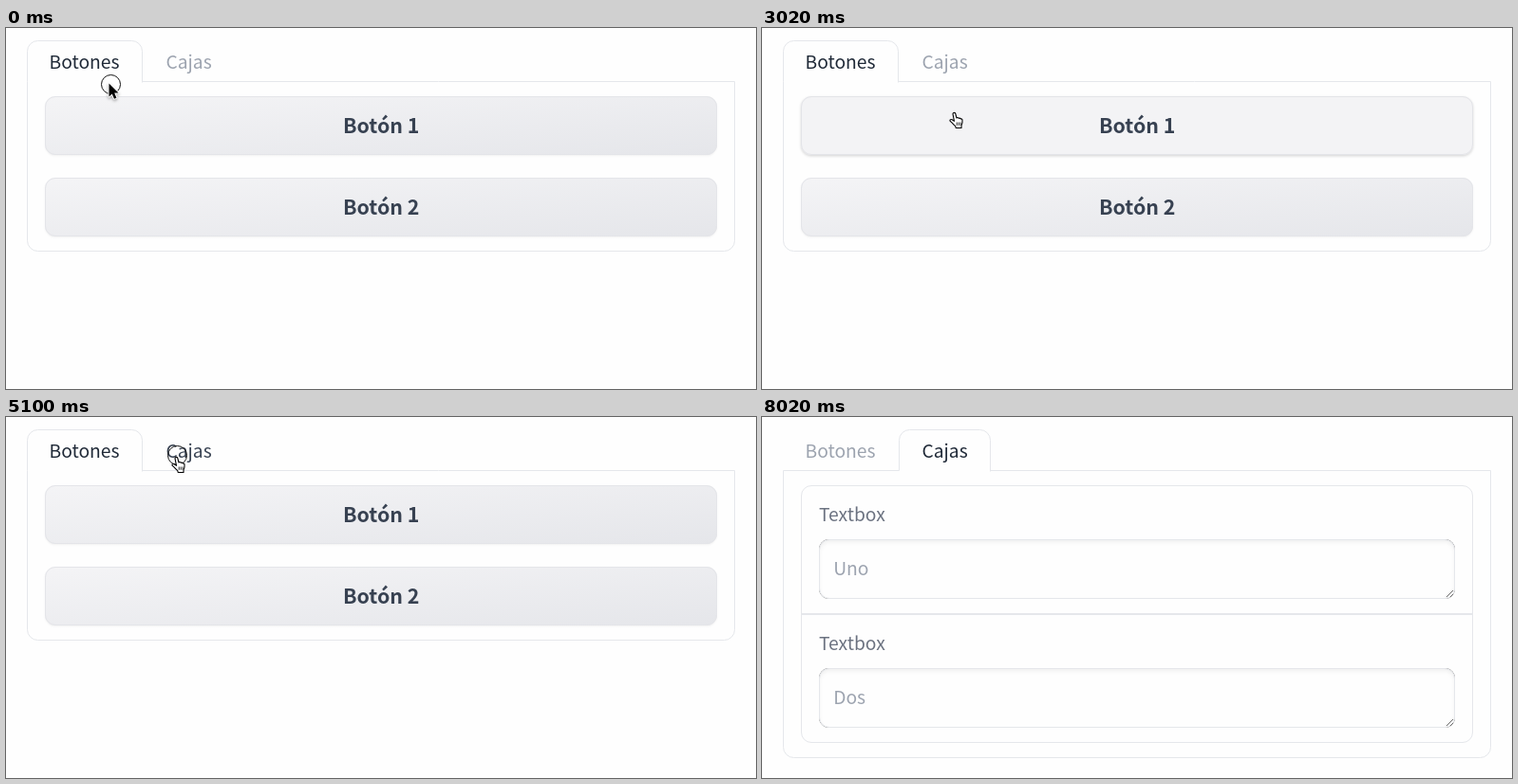
An HTML page with a canvas that plays this animation: 790x381 px, repeating every 8040 ms.

```html
<!DOCTYPE html>
<html lang="es">
<head>
<meta charset="utf-8">
<title>Botones y cajas</title>
<style>
html, body { margin: 0; width: 100%; height: 100%; overflow: hidden; background: #fefefe; }
canvas { display: block; }
</style>
</head>
<body>
<canvas id="stage" width="790" height="381"></canvas>
<script>
const ctx = document.getElementById('stage').getContext('2d', { alpha: false });
const LOOP = 8040;
const SWITCH = 5220;
const BG = '#fefefe', LINE = '#e5e7eb', MUTED = '#9ca3af';
const FONT = '"Noto Sans CJK JP", "Noto Sans CJK SC", "Noto Sans CJK KR", "Noto Sans CJK", "Open Sans", sans-serif';

const tabs = [
  { label: 'Botones', x: 22, w: 122, textX: 45.5 },
  { label: 'Cajas', x: 144, w: 97, textX: 168.4 }
];
const buttons = [
  { label: 'Botón 1', x: 41, y: 72, w: 708, h: 62, press: [2970, 3020] },
  { label: 'Botón 2', x: 41, y: 158, w: 708, h: 62, press: [4420, 4480] }
];
const boxes = [
  { hint: 'Uno', x: 60, y: 129, w: 670, h: 63, focus: [6140, 6900] },
  { hint: 'Dos', x: 60, y: 265, w: 670, h: 63, focus: [6900, 8020] }
];
const clicks = [[0, 60], [1330, 1450], [2970, 3020], [4420, 4480], [5100, 5220], [6140, 6200], [6900, 6960]];

// Pointer path: time, x, y
const path = [
  [0, 110.5, 59.5], [50, 110.5, 59.5], [230, 97, 31], [400, 91.5, 39],
  [560, 91.5, 39], [850, 118, 98], [1150, 88.5, 38.5],
  [1740, 88.5, 38.5], [1750, 86.5, 44], [2550, 202.5, 87], [2610, 203.5, 87.5],
  [3520, 203.5, 87.5], [3850, 195, 42], [4310, 161.5, 191],
  [4450, 161.5, 191], [4930, 180.5, 40.5],
  [5530, 180.5, 40.5], [6090, 176.5, 161],
  [6520, 176.5, 161], [6870, 176.5, 297],
  [7170, 176.5, 297], [7480, 718, 372], [7540, 722, 410]
];

const during = (t, [a, b]) => t >= a && t < b;
const inside = (p, r) => p.x >= r.x && p.x < r.x + r.w && p.y >= r.y && p.y < r.y + r.h;
const overTab = (p, tab) => inside(p, { x: tab.x, y: 13, w: tab.w, h: 44 });

function pointerAt(t) {
  const i = path.findIndex(k => k[0] > t);
  if (i < 0) return { x: 722, y: 410 };
  const [t0, x0, y0] = path[i - 1], [t1, x1, y1] = path[i];
  const u = (t - t0) / (t1 - t0), e = u * u * (3 - 2 * u);
  return { x: x0 + (x1 - x0) * e, y: y0 + (y1 - y0) * e };
}

function text(str, x, y, color, size = 19.25, weight = 400, align = 'left') {
  ctx.font = `${weight} ${size}px ${FONT}`;
  ctx.textAlign = align;
  ctx.fillStyle = color;
  ctx.fillText(str, x, y);
}

function rounded(r, inset = 0, radius = 11) {
  ctx.beginPath();
  ctx.roundRect(r.x + inset, r.y + inset, r.w - 2 * inset, r.h - 2 * inset, radius - inset);
}

function stroke(color, width = 1) {
  ctx.strokeStyle = color;
  ctx.lineWidth = width;
  ctx.stroke();
}

function shadow(color, blur, dy) {
  ctx.shadowColor = color;
  ctx.shadowBlur = blur;
  ctx.shadowOffsetY = dy;
}

function innerShadow(r, alpha) {
  ctx.save();
  rounded(r);
  ctx.clip();
  shadow(`rgba(0,0,0,${alpha})`, 5, 2.5);
  ctx.beginPath();
  ctx.rect(r.x - 20, r.y - 20, r.w + 40, r.h + 40);
  ctx.roundRect(r.x, r.y, r.w, r.h, 11);
  ctx.fillStyle = '#000';
  ctx.fill('evenodd');
  ctx.restore();
}

// Same geometry as a CSS gradient "to bottom right"
function cornerGradient({ x, y, w, h }) {
  const k = w * h / (w * w + h * h), cx = x + w / 2, cy = y + h / 2;
  const g = ctx.createLinearGradient(cx - h * k, cy - w * k, cx + h * k, cy + w * k);
  g.addColorStop(0, '#f4f4f6');
  g.addColorStop(1, '#e5e6ea');
  return g;
}

function drawFrame(active, bottom) {
  const x0 = tabs[active].x + 0.5, x1 = tabs[active].x + tabs[active].w - 0.5;
  ctx.beginPath();
  ctx.moveTo(x1, 56.5);
  ctx.lineTo(767.5, 56.5);
  ctx.arcTo(767.5, bottom, 700, bottom, 11);
  ctx.arcTo(22.5, bottom, 22.5, 100, 11);
  ctx.lineTo(22.5, 56.5);
  ctx.lineTo(x0, 56.5);
  ctx.arcTo(x0, 13.5, x0 + 40, 13.5, 11);
  ctx.arcTo(x1, 13.5, x1, 40, 11);
  ctx.lineTo(x1, 57.5);
  stroke(LINE);
}

function drawButton(b, t, p) {
  const hover = inside(p, b);
  ctx.save();
  if (hover) shadow('rgba(0,0,0,.16)', 3, 1.3);
  else shadow('rgba(0,0,0,.05)', 2, 1);
  rounded(b);
  ctx.fillStyle = hover ? '#f3f3f5' : cornerGradient(b);
  ctx.fill();
  ctx.restore();
  if (during(t, b.press)) innerShadow(b, 0.08);
  rounded(b, 0.5);
  stroke(hover ? '#e3e4e8' : '#e4e5e9');
  text(b.label, 395.2, b.y + 39, '#374151', 21.4, 600, 'center');
}

function drawBox(b, t) {
  const focused = during(t, b.focus);
  text('Textbox', 60, b.y - 19, '#6b7280');
  innerShadow(b, 0.07);
  rounded(b, 0.5);
  stroke(focused ? '#a3cdfd' : LINE);
  text(b.hint, 75.2, b.y + 38, MUTED);
  if (focused && (t - b.focus[0]) % 1000 < 500) {
    ctx.fillStyle = '#1f2937';
    ctx.fillRect(76, b.y + 18, 1.3, 27);
  }
  const x = b.x + b.w, y = b.y + b.h;
  ctx.beginPath();
  ctx.moveTo(x - 9, y - 2);
  ctx.lineTo(x - 2, y - 9);
  ctx.moveTo(x - 5, y - 2);
  ctx.lineTo(x - 2, y - 5);
  stroke('#6b6b6b');
}

const hand = new Path2D('M4.1 2.6C3.6 .9 6.2 .2 6.8 1.9L8 6.5C8.4 5.7 10 5.9 10.2 6.9C10.6 6.3 12 6.5 12.2 7.5C12.8 7.1 13.9 7.5 14 8.5C14.3 10.5 14.2 12 13 14.5L13 17L7.2 17L6.8 15.2C5 13.5 3.5 11.8 1.6 10.2C0 8.8 1.8 7.4 3.2 8.3L5.5 9.8Z');
const creases = new Path2D('M8.2 11V14.3M10.1 11V14.3M12 11V14.3');
const arrow = new Path2D('M0 0V14L3.2 11L5.5 16.2L7.9 15.2L5.7 10.1H10Z');
const beam = new Path2D('M-3 -7.5Q0 -7.5 0 -5.5Q0 -7.5 3 -7.5M0 -5.5V5.5M-3 7.5Q0 7.5 0 5.5Q0 7.5 3 7.5M-2 2H2');

function pen(shape, color, width) {
  ctx.strokeStyle = color;
  ctx.lineWidth = width;
  ctx.stroke(shape);
}

function drawPointer(p, t, kind) {
  if (clicks.some(c => during(t, c))) {
    ctx.beginPath();
    ctx.arc(p.x, p.y, 10, 0, Math.PI * 2);
    stroke('#111');
  }
  ctx.save();
  ctx.lineJoin = 'round';
  if (kind === 'hand') {
    ctx.translate(p.x - 6.5, p.y + 1);
    ctx.fillStyle = '#fff';
    ctx.fill(hand);
    pen(hand, '#000', 1.1);
    pen(creases, '#000', 0.8);
  } else if (kind === 'beam') {
    ctx.translate(p.x, p.y);
    pen(beam, '#fff', 2.6);
    pen(beam, '#000', 1.2);
  } else {
    ctx.translate(p.x - 2, p.y - 1);
    ctx.save();
    shadow('rgba(0,0,0,.35)', 3, 1.5);
    pen(arrow, '#fff', 2);
    ctx.restore();
    ctx.fillStyle = '#000';
    ctx.fill(arrow);
  }
  ctx.restore();
}

function draw(t) {
  const p = pointerAt(t), active = t < SWITCH ? 0 : 1;
  ctx.fillStyle = BG;
  ctx.fillRect(0, 0, 790, 381);
  drawFrame(active, active ? 359.5 : 235.5);
  tabs.forEach((tab, i) => {
    const color = i === active ? '#1f2937' : overTab(p, tab) ? '#374151' : MUTED;
    text(tab.label, tab.textX, 43, color);
  });

  let kind = tabs.some(tab => overTab(p, tab)) ? 'hand' : 'arrow';
  if (active) {
    rounded({ x: 41, y: 72, w: 708, h: 272 }, 0.5);
    stroke(LINE);
    ctx.fillStyle = LINE;
    ctx.fillRect(41, 207, 708, 2);
    boxes.forEach(b => drawBox(b, t));
    if (boxes.some(b => inside(p, b))) kind = 'beam';
  } else {
    buttons.forEach(b => drawButton(b, t, p));
    if (buttons.some(b => inside(p, b))) kind = 'hand';
  }
  drawPointer(p, t, kind);
}

const start = performance.now();
function tick() {
  draw((performance.now() - start) % LOOP);
  requestAnimationFrame(tick);
}
tick();
</script>
</body>
</html>
```
